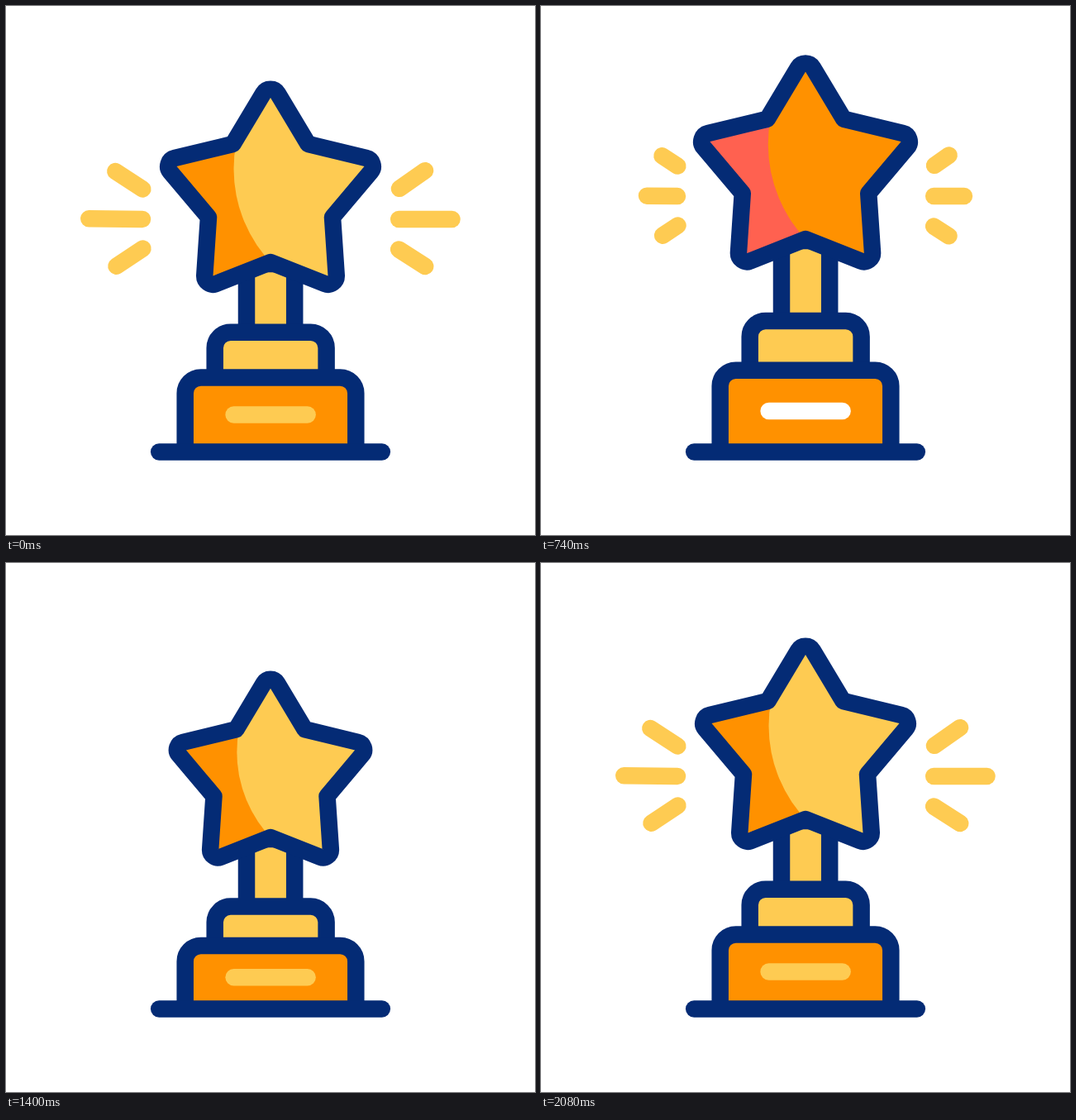
Animation of 640x640 px, one loop 2340 ms. Source, as an HTML page:

```html
<!DOCTYPE html>
<html lang="en">
<head>
<meta charset="utf-8">
<title>Trophy</title>
<style>
  html, body { margin: 0; width: 100%; height: 100%; overflow: hidden; background: #fff; }
  svg { display: block; width: 100vw; height: 100vh; }
  .line { fill: none; stroke: #042b75; stroke-width: 20.5; stroke-linecap: round; stroke-linejoin: round; }
  .gold { fill: #fecb52; }
  .amber { fill: #ff9100; }
  .bar { fill: none; stroke: #fecb52; stroke-width: 20.5; stroke-linecap: round; }
</style>
</head>
<body>
<svg viewBox="0 0 640 640">
  <defs><clipPath id="inside"><path id="clip"/></clipPath></defs>
  <g id="rays"></g>
  <path id="stem" class="line gold" style="stroke-linecap:butt"/>
  <path id="upper" class="line gold" style="stroke-linecap:butt"/>
  <path id="lower" class="line amber" style="stroke-linecap:butt"/>
  <path id="label" class="bar"/>
  <path class="line" d="M185.2 539.5H454.8"/>
  <g id="star">
    <path id="shade"/>
    <g clip-path="url(#inside)"><circle id="face" cx="441.5" cy="197" r="166"/></g>
    <path id="edge" class="line"/>
  </g>
</svg>
<script>
const LOOP = 2340, STEP = 20, STROKE = 20.5;
const GOLD = [254, 203, 82], AMBER = [255, 145, 0], CORAL = [255, 97, 80], WHITE = [255, 255, 255];
const $ = id => document.getElementById(id);

// Each track is a list of [time, value], eased between neighbours.
const tracks = {
  base:  [[200, 0], [400, 12], [900, -15.5], [1010, -15.5], [1440, 14.2], [1640, -9], [2080, 0]],
  lift:  [[200, 0], [400, 29], [860, -39.5], [1010, -39.5], [1440, 23.5], [1640, -18], [2080, 0]],
  scale: [[200, 1], [400, .811], [860, 1.058], [1010, 1.058], [1440, .91], [1640, 1]],
  rays:  [[200, 0], [450, 1], [550, 1], [897, 2], [1080, 2], [1360, 3], [1440, 3], [1700, 4]],
  tint:  [[420, 0], [660, 1], [960, 1], [1260, 0]],
  label: [[420, 0], [660, 1], [1080, 1], [1340, 0]]
};

function valueAt(keys, t) {
  if (t <= keys[0][0]) return keys[0][1];
  for (let i = 1; i < keys.length; i++) {
    const [t0, v0] = keys[i - 1], [t1, v1] = keys[i];
    if (t < t1) {
      const p = (t - t0) / (t1 - t0);
      return v0 + (v1 - v0) * p * p * (3 - 2 * p);
    }
  }
  return keys[keys.length - 1][1];
}

const mix = (a, b, p) => `rgb(${a.map((v, i) => Math.round(v + (b[i] - v) * p))})`;

// Star outline: rounded tips joined by tangents to plain notches.
function starPath() {
  const tips = [[320, 111], [433.5, 194], [389.5, 326.5], [250.5, 326.5], [206.5, 194]];
  const notches = [[365.5, 167], [395, 255.5], [320, 310], [245, 255.5], [274.5, 167]];
  const r = STROKE / 2;
  const tangent = ([cx, cy], [nx, ny], side) => {
    const dx = nx - cx, dy = ny - cy;
    const a = Math.atan2(dy, dx) + side * Math.acos(r / Math.hypot(dx, dy));
    return `${cx + r * Math.cos(a)} ${cy + r * Math.sin(a)}`;
  };
  return tips.map((tip, i) => {
    const before = notches[(i + 4) % 5], after = notches[i];
    return `${i ? 'L' : 'M'}${tangent(tip, before, 1)}A${r} ${r} 0 0 1 ${tangent(tip, after, -1)}L${after.join(' ')}`;
  }).join('') + 'Z';
}

const box = (x0, x1, top, bottom) => {
  const r = 19;
  return `M${x0} ${bottom}V${top + r}a${r} ${r} 0 0 1 ${r} ${-r}H${x1 - r}a${r} ${r} 0 0 1 ${r} ${r}V${bottom}`;
};

// Inner end, then outer end.
const rayEnds = [
  [165.3, 221.5, 132.3, 200], [165, 258, 100.3, 257.3], [165.5, 293.5, 133.5, 314.7],
  [476, 220.8, 507, 199.2], [475.2, 258, 539.5, 258], [475.2, 294.5, 507.2, 315]
];
const rays = rayEnds.map(() => {
  const el = document.createElementNS('http://www.w3.org/2000/svg', 'path');
  el.setAttribute('class', 'bar');
  return $('rays').appendChild(el);
});

for (const id of ['clip', 'shade', 'edge']) $(id).setAttribute('d', starPath());

function draw(t) {
  const now = {};
  for (const name in tracks) now[name] = valueAt(tracks[name], t);
  const { base, lift, scale } = now;
  const lowTop = 449.5 + base, highTop = 394.7 + base * 1.55;

  $('lower').setAttribute('d', box(216.7, 423.3, lowTop, 539.5));
  $('upper').setAttribute('d', box(252.7, 387.6, highTop, lowTop));
  $('stem').setAttribute('d', `M291 ${highTop}V${312 + lift}H349.2V${highTop}`);
  $('label').setAttribute('d', `M275.6 ${494.5 + base / 2}H364.6`);
  $('label').style.stroke = mix(GOLD, WHITE, now.label);

  $('star').setAttribute('transform', `translate(320 ${309.5 + lift}) scale(${scale}) translate(-320 -309.5)`);
  $('edge').style.strokeWidth = STROKE / scale;
  $('face').style.fill = mix(GOLD, AMBER, now.tint);
  $('shade').style.fill = mix(AMBER, CORAL, now.tint);

  // First half of a cycle erases outward, second half grows outward.
  const phase = now.rays % 2;
  const from = phase < 1 ? phase : 0, to = phase < 1 ? 1 : phase - 1;
  $('rays').setAttribute('transform', `translate(0 ${lift})`);
  $('rays').style.display = to - from < .005 ? 'none' : '';
  rayEnds.forEach(([x0, y0, x1, y1], i) => {
    const at = p => `${x0 + (x1 - x0) * p} ${y0 + (y1 - y0) * p}`;
    rays[i].setAttribute('d', `M${at(from)}L${at(to)}`);
  });
}

const start = performance.now();
function tick() {
  const t = (performance.now() - start) % LOOP;
  draw(Math.floor(t / STEP) * STEP);
  requestAnimationFrame(tick);
}
tick();
</script>
</body>
</html>
```
